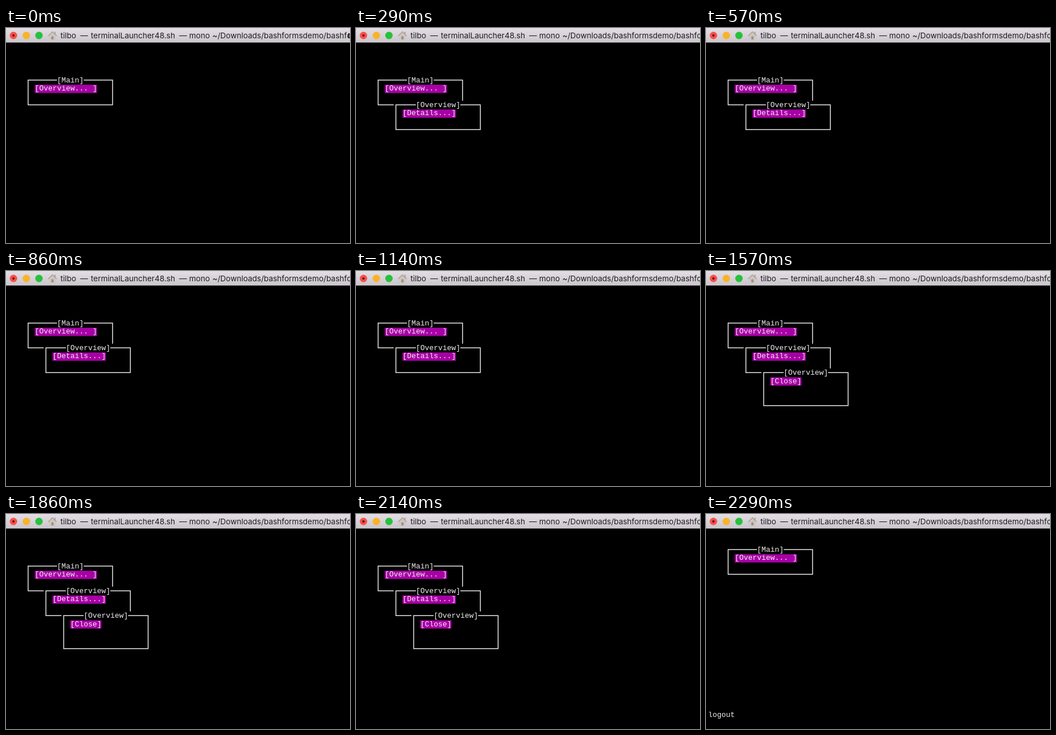
Write an HTML page with a canvas that moves like this. It is 600x375 px and loops after 2440 ms.

```html
<!DOCTYPE html>
<html lang="en">
<head>
<meta charset="utf-8">
<title>Terminal forms</title>
<style>
  html, body { margin: 0; width: 600px; height: 375px; overflow: hidden; background: #000; }
  canvas { display: block; }
</style>
</head>
<body>
<canvas id="stage" width="600" height="375"></canvas>
<script>
const ctx = document.getElementById('stage').getContext('2d');
const LOOP = 2440, CELL_W = 7.75, CELL_H = 14.4;
const MONO = '12.92px "Liberation Mono", monospace';
const SANS = '13.5px Inter, sans-serif';

const colX = col => 3.7 + col * CELL_W;
const rowY = row => 62 + row * CELL_H; // vertical middle of a text row

function text(string, x, baseline, font, color) {
  ctx.font = font;
  ctx.fillStyle = color;
  ctx.fillText(string, x, baseline);
}

function rect(x, y, w, h, color) {
  ctx.fillStyle = color;
  ctx.fillRect(x, y, w, h);
}

function dot(x, y, r, color) {
  ctx.fillStyle = color;
  ctx.beginPath();
  ctx.arc(x, y, r, 0, Math.PI * 2);
  ctx.fill();
}

function shape(path, color) {
  ctx.fillStyle = color;
  ctx.fill(new Path2D(path));
}

function print(string, col, row) {
  text(string, colX(col), rowY(row) + 4, MONO, '#f0f0f0');
}

// A bordered form, 20 columns wide, that blanks the cells below it.
function form(col, row, rows, title, button) {
  const left = colX(col), top = rowY(row);
  rect(left, top - CELL_H / 2, 20 * CELL_W, (rows + 1) * CELL_H, '#000');
  ctx.strokeStyle = '#e6e6e6';
  ctx.lineWidth = 1.5;
  ctx.strokeRect(left + CELL_W / 2, top, 19 * CELL_W, rows * CELL_H);

  const titleCol = col + Math.floor((20 - title.length) / 2);
  rect(colX(titleCol), top - 2, title.length * CELL_W, 4, '#000');
  print(title, titleCol, row);

  rect(colX(col + 2), rowY(row + 1) - 6.2, button.length * CELL_W, CELL_H, '#a800a6');
  print(button, col + 2, row + 1);
}

function house() {
  shape('M75.5 13L81 8L86.5 13V20H75.5Z', '#cdc7c0');
  shape('M79 14.5H83V20H79Z', '#a4927f');
  shape('M73 13.5L81 5.5L84.5 9V6.5H86.5V11L89 13.5L88 14.5L81 7.8L74 14.5Z', '#aaa198');
}

function titleBar(t) {
  const shade = ctx.createLinearGradient(0, 0, 0, 25);
  shade.addColorStop(0, '#e3dee4');
  shade.addColorStop(1, '#cbc6cc');
  rect(0, 0, 600, 25, shade);
  rect(0, 25, 600, 1, '#4a484a');

  dot(13, 13, 6.5, '#f9504c');
  dot(13, 13, 2, '#5c0805');
  dot(35.5, 13, 6.5, '#f8b32c');
  dot(57.5, 13, 6.5, '#27c13c');
  house();

  const words = [
    ['tilbo', 95], ['—', 129.5], ['terminalLauncher48.sh', 148], ['—', 302],
    ['mono', 319.5], ['~/Downloads/bashformsdemo/bashforms', 360]
  ];
  for (const [word, x] of words) text(word, x, 18, SANS, '#1f1d20');
  if (t < 140) rect(597, 9, 2, 9, '#222');
}

function draw(t) {
  rect(0, 0, 600, 375, '#000');
  titleBar(t);
  const closed = t >= 2290;
  form(4, closed ? 0 : 2, 3, '[Main]', '[Overview... ]');
  if (closed) {
    print('logout', 0, 20);
    return;
  }
  if (t >= 290) form(8, 5, 3, '[Overview]', '[Details...]');
  if (t >= 1290) form(12, 8, 4, '[Overview]', '[Close]');
}

const start = performance.now();
function tick() {
  draw((performance.now() - start) % LOOP);
  requestAnimationFrame(tick);
}
tick();
</script>
</body>
</html>
```
